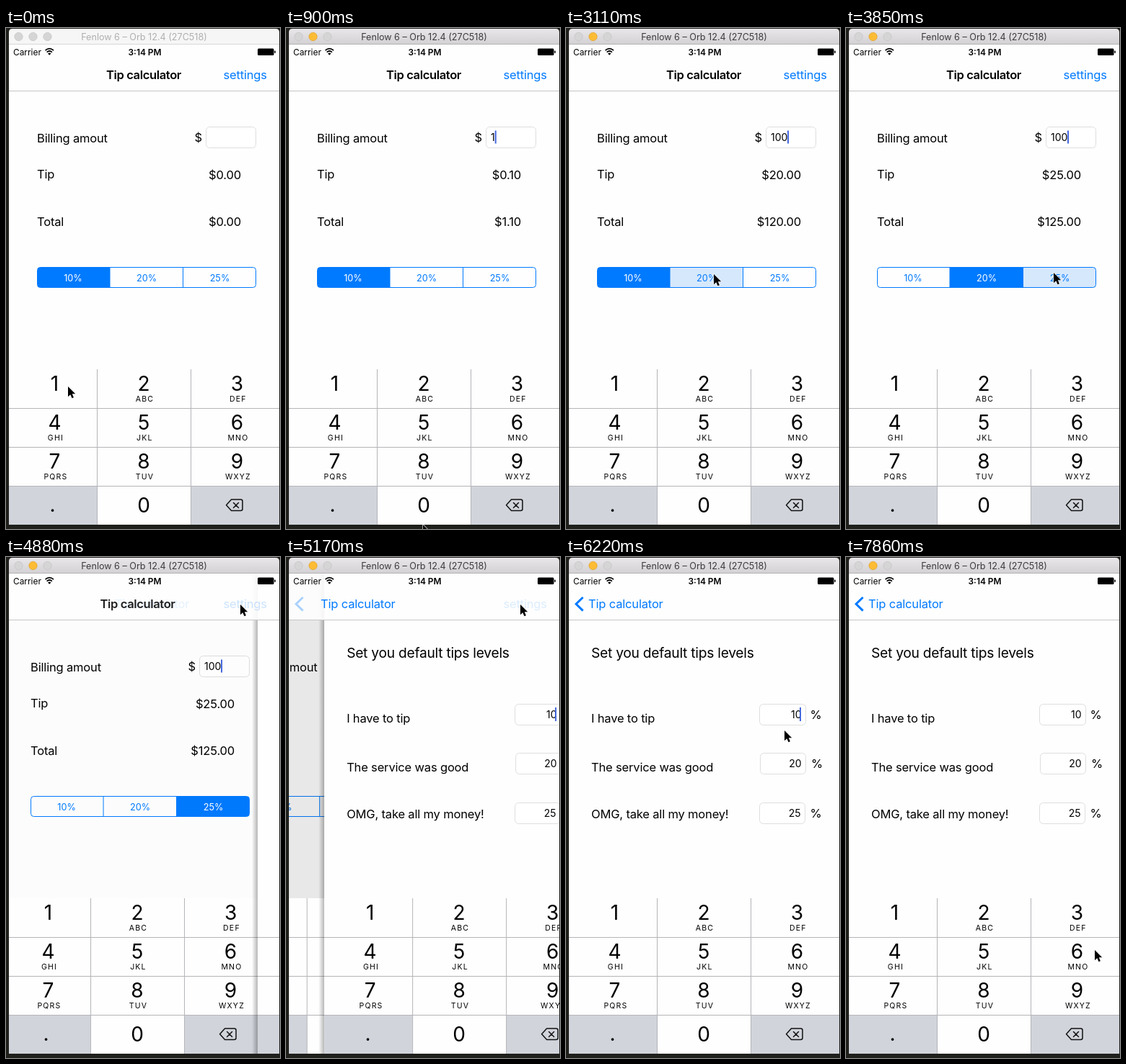
Recreate the animation shown at these times as an HTML page. Size 380 px wide and 696 px high, loop 8000 ms.

```html
<!DOCTYPE html>
<html lang="en">
<head>
<meta charset="utf-8">
<title>Tip calculator</title>
<style>
  html, body { margin: 0; width: 100%; height: 100%; overflow: hidden; background: #1f1f1c; }
  svg { display: block; width: 380px; height: 696px; }
  text { font: 16.5px Inter, Roboto, sans-serif; letter-spacing: -.17px; fill: #000; white-space: pre; }
  .mid { text-anchor: middle; }
  .end { text-anchor: end; }
  .blue { fill: #007aff; }
  .small { font-size: 14px; letter-spacing: 0; }
  .seg { font-size: 12.7px; letter-spacing: 0; }
  .digit { font-size: 28px; letter-spacing: 0; }
  .abc { font-size: 10.5px; letter-spacing: 1.2px; }
  .bar { font-size: 11.9px; letter-spacing: 0; }
  .head { font-size: 19.2px; letter-spacing: -.25px; }
  .win { font-size: 12.6px; letter-spacing: 0; }
  .navtitle { font-weight: 600; letter-spacing: -.35px; }
  .field { fill: #fff; stroke: #dedede; }
  .caret { fill: #4468e0; }
</style>
</head>
<body>
<svg id="stage" viewBox="0 0 380 696" xmlns="http://www.w3.org/2000/svg"></svg>
<script>
const BLUE = '#007aff', KEY_GRAY = '#d1d4db', PAGE = '#fefefe';

const text = (x, y, s, cls = '', id = '') =>
  `<text x="${x}" y="${y}" class="${cls}" ${id && `id="${id}"`}>${s}</text>`;
const rect = (x, y, w, h, attrs) =>
  `<rect x="${x}" y="${y}" width="${w}" height="${h}" ${attrs}/>`;

function keypad(prefix) {
  const cols = [4, 126.5, 256.5, 379], centers = [67.5, 191, 320.5];
  const letters = ['', 'ABC', 'DEF', 'GHI', 'JKL', 'MNO', 'PQRS', 'TUV', 'WXYZ'];
  let out = rect(4, 474, 375, 216, `fill="${PAGE}"`);
  out += rect(4, 636.5, 122.5, 53.5, `fill="${KEY_GRAY}"`) + rect(256.5, 636.5, 122.5, 53.5, `fill="${KEY_GRAY}"`);
  out += rect(4, 474, 122.5, 54.5, `id="${prefix}1" fill="${KEY_GRAY}"`);
  out += rect(126.5, 636.5, 130, 53.5, `id="${prefix}0" fill="${KEY_GRAY}"`);
  out += `<path d="M4 528.5H379M4 582.5H379M4 636.5H379M${cols[1]} 474V690M${cols[2]} 474V690" stroke="#b4b5b8" fill="none"/>`;
  letters.forEach((abc, i) => {
    const x = centers[i % 3], y = 504 + 54 * Math.floor(i / 3);
    out += text(x, y, i + 1, 'digit mid') + text(x + 1.4, y + 15, abc, 'abc mid');
  });
  out += text(64.5, 672, '.', 'digit mid') + text(191, 673, '0', 'digit mid');
  out += `<path d="M312.5 655H325.5Q328 655 328 657.500V668Q328 670.500 325.500 670.500H312.500L305.500 662.800Z
    M315.500 659.500L322.500 666.500M322.500 659.500L315.500 666.500" fill="none" stroke="#111" stroke-width="1.5" stroke-linejoin="round" stroke-linecap="round"/>`;
  return out;
}

function segments() {
  const edges = [43.5, 144, 245.5, 346.5];
  let out = '<g clip-path="url(#segClip)">';
  for (let i = 0; i < 3; i++)
    out += rect(edges[i], 332.5, edges[i + 1] - edges[i], 28, `id="seg${i}"`);
  out += `</g><path d="M144 332.5V360.500M245.500 332.500V360.500" stroke="${BLUE}"/>`;
  out += rect(43.5, 332.5, 303, 28, `rx="4" fill="none" stroke="${BLUE}"`);
  return out + ['10%', '20%', '25%'].map((s, i) =>
    text([93, 195, 296.5][i], 351.5, s, 'seg mid', 'segText' + i)).join('');
}

function setting(label, y, x, w, value, right, percentX, base) {
  return text(35, base, label) + rect(x, y, w, 29, 'rx="5" class="field"') +
    text(right, y + 19.3, value, 'small end') + text(percentX, y + 20.6, '%');
}

const calculator = rect(4, 87, 375, 603, `fill="${PAGE}"`) +
  text(43, 158.5, 'Billing amout') + text(261.5, 158, '$') +
  rect(277.5, 137.5, 69, 29, 'rx="5" class="field"') +
  text(284, 157, '', 'small', 'bill') + rect(0, 142.5, 2, 18, 'id="caretA" class="caret"') +
  text(43, 208.5, 'Tip') + text(326, 209.5, '', 'end', 'tip') +
  text(43, 274.5, 'Total') + text(326, 274.5, '', 'end', 'total') + segments() +
  rect(4, 23, 375, 451, 'id="dim"') + keypad('key');

const settings = rect(-4, 23, 8, 667, 'fill="url(#shade)"') + rect(4, 23, 375, 667, `fill="${PAGE}"`) +
  text(35, 139.5, 'Set you default tips levels', 'head') +
  setting('I have to tip', 204.5, 268.5, 64, '10', 326.5, 338.5, 229.5) +
  setting('The service was good', 272.5, 269.5, 63, '20', 326.5, 340, 297.5) +
  setting('OMG, take all my money!', 341.5, 268.5, 63, '25', 325.5, 338.5, 362.5) +
  rect(324, 209, 2, 19, 'id="caretB" class="caret"') + keypad('alt');

const navBar = rect(4, 23, 375, 64.5, 'fill="#fefefe" fill-opacity=".9"') +
  '<path d="M4 87.500H379" stroke="#c6c6c8"/>' +
  `<path id="chevron" d="M23.500 56L14 65.300L23.500 74.600" fill="none" stroke="${BLUE}" stroke-width="3"/>` +
  text(31, 71, 'Tip calculator', 'blue', 'back') +
  text(191, 71, 'Tip calculator', 'mid navtitle', 'navTitle') +
  text(301.5, 71, 'settings', 'blue', 'more') +
  text(10, 37.5, 'Carrier', 'bar') +
  '<path d="M54.500 31.200Q60.200 26.200 66 31.200M56.600 33.600Q60.200 30.400 63.900 33.600" fill="none" stroke="#000" stroke-width="1.700"/>' +
  '<path d="M58.100 35.400Q60.200 33.700 62.400 35.400L60.200 37.800Z"/>' +
  '<text x="192.5" y="37.5" class="bar mid" style="font-weight:600">3:14 PM</text>' +
  rect(349, 28.5, 22.5, 9.5, 'rx="1.5"') + rect(372.3, 31.5, 1.5, 3.5, 'rx=".7"');

const titleBar = '<path id="titleBg" d="M4 23V6Q4 1 9 1H374Q379 1 379 6V23Z"/>' +
  '<path id="titleLine" d="M4 22.500H379"/>' +
  [17.5, 37.5, 57.5].map((x, i) =>
    `<circle id="dot${i}" cx="${x}" cy="12" r="5.7" fill="#d6d5d6" stroke="#c4c3c4" stroke-width=".7"/>`).join('') +
  text(191.5, 16.8, 'Fenlow 6 – Orb 12.4 (27C518)', 'win mid', 'winTitle');

document.getElementById('stage').innerHTML = `<defs>
  <clipPath id="screen">${rect(4, 23, 375, 667, '')}</clipPath>
  <clipPath id="segClip">${rect(43.5, 332.5, 303, 28, 'rx="4"')}</clipPath>
  <linearGradient id="shade"><stop offset="0" stop-opacity="0"/><stop offset="1" stop-opacity=".28"/></linearGradient>
  <linearGradient id="chrome" x2="0" y2="1"><stop stop-color="#e9e7e9"/><stop offset="1" stop-color="#d2d0d2"/></linearGradient>
  </defs>` + rect(0, 0, 380, 696, 'fill="#1f1f1c"') + titleBar +
  `<g clip-path="url(#screen)">${rect(4, 23, 375, 667, `fill="${PAGE}"`)}
  <g id="viewA">${calculator}</g><g id="viewB">${settings}</g>${navBar}</g>
  <path id="cursor" d="M0 0V14.200L3.300 11.200L5.500 16.200L7.900 15.200L5.800 10.300H10.200Z"
    fill="#000" stroke="#fff" stroke-width="1.200" stroke-linejoin="round" paint-order="stroke"/>`;

const $ = {};
document.querySelectorAll('#stage [id]').forEach(el => { $[el.id] = el; });
const set = (id, attrs) => {
  for (const name in attrs) $[id].setAttribute(name, attrs[name]);
};

// Each step lists only what changes; at = pointer, hot = touched segment, push = screen change
const steps = [
  [0, { at: [86, 498], active: false, bill: '', caret: 0, rate: .1, seg: 0, hot: -1, key: '', push: 0, touch: false }],
  [150, { active: true, caret: 1 }],
  [300, { key: '1' }],
  [450, { key: '', bill: '1' }],
  [750, { at: [135, 610] }],
  [900, { at: [190, 690] }],
  [1050, { at: [190, 670] }],
  [1190, { key: '0' }],
  [1340, { key: '', bill: '10' }],
  [1480, { key: '0' }],
  [1780, { key: '', bill: '100' }],
  [2070, { at: [232, 440] }],
  [2220, { at: [268, 230] }],
  [2370, { at: [262, 262] }],
  [2520, { at: [240, 305] }],
  [2670, { at: [215, 335] }],
  [2810, { at: [205, 342] }],
  [2960, { hot: 1 }],
  [3110, { rate: .2 }],
  [3260, { hot: -1, seg: 1 }],
  [3410, { at: [235, 343] }],
  [3560, { at: [275, 341] }],
  [3700, { at: [288, 340], hot: 2 }],
  [3850, { rate: .25 }],
  [4000, { hot: -1, seg: 2 }],
  [4150, { at: [300, 215] }],
  [4300, { at: [322, 95] }],
  [4440, { at: [326, 70] }],
  [4590, { at: [325, 66] }],
  [4740, { touch: true }],
  [4880, { push: .08 }],
  [5030, { push: .52 }],
  [5170, { push: .869 }],
  [5320, { push: .975 }],
  [5470, { push: 1 }],
  [5620, { at: [318, 95] }],
  [5770, { at: [300, 160] }],
  [5920, { at: [288, 215] }],
  [6070, { at: [294, 236] }],
  [6220, { at: [303, 241] }],
  [6520, { caret: .45 }],
  [6670, { caret: 0 }],
  [7120, { caret: 1 }],
  [7570, { at: [309, 275], caret: .7 }],
  [7720, { at: [334, 440], caret: .3 }],
  [7860, { at: [345, 546], caret: 0 }]
];
let last = {};
const states = steps.map(([, change]) => (last = { ...last, ...change }));
const caretX = [284, 289.7, 299, 307];

function draw(s) {
  const p = s.push, amount = Number(s.bill);
  set('cursor', { transform: `translate(${s.at})` });

  set('titleBg', { fill: s.active ? 'url(#chrome)' : '#f6f6f6' });
  set('titleLine', { stroke: s.active ? '#b5b3b5' : '#d8d8d8' });
  set('dot1', { fill: s.active ? '#fdbc34' : '#d6d5d6', stroke: s.active ? '#e0a02e' : '#c4c3c4' });
  $.winTitle.style.fill = s.active ? '#3d3b3d' : '#b0afb0';

  $.bill.textContent = s.bill;
  set('caretA', { x: caretX[s.bill.length], opacity: s.caret });
  set('caretB', { opacity: s.caret });
  $.tip.textContent = '$' + (amount * s.rate).toFixed(2);
  $.total.textContent = '$' + (amount * (1 + s.rate)).toFixed(2);
  for (let i = 0; i < 3; i++) {
    set('seg' + i, { fill: i === s.seg ? BLUE : i === s.hot ? '#d6e8fc' : PAGE });
    $['segText' + i].style.fill = i === s.seg ? '#fff' : BLUE;
  }
  for (const k of '01') {
    set('key' + k, { opacity: s.key === k ? 1 : 0 });
    set('alt' + k, { opacity: 0 });
  }

  set('viewA', { transform: `translate(${-112 * p})` });
  set('viewB', { transform: `translate(${375 * (1 - p)})`, display: p ? 'inline' : 'none' });
  set('dim', { opacity: .1 * p });
  set('chevron', { opacity: p ** 8 });
  set('back', { x: 31 + 130 * (1 - p), opacity: Math.min(1, p * 1.2) });
  set('navTitle', { x: 191 - 106 * p, opacity: Math.max(0, 1 - 1.5 * p) });
  set('more', { opacity: Math.min(s.touch ? .2 : 1, 1 - p) });
}

let shown = -1;
function tick(now) {
  const t = now % 8000;
  let i = steps.length - 1;
  while (steps[i][0] > t) i--;
  if (i !== shown) draw(states[shown = i]);
  requestAnimationFrame(tick);
}
tick(performance.now());
</script>
</body>
</html>
```
